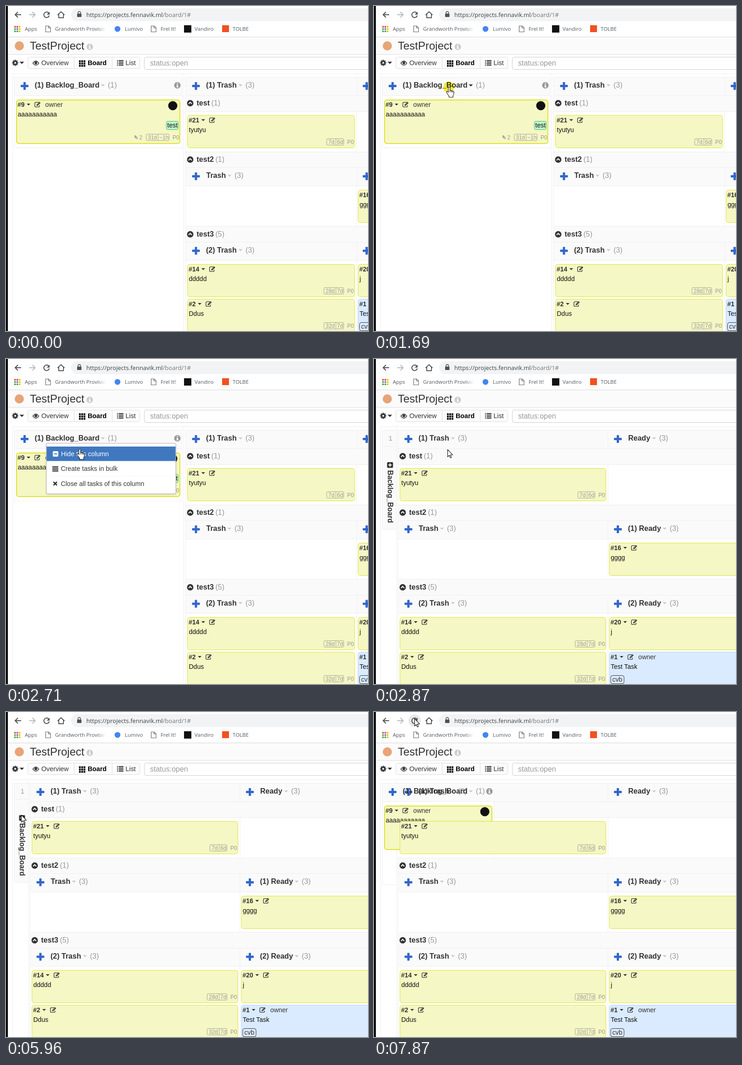
These frames come from a looping animation (789x709 px, 8000 ms). An HTML page:

```html
<!DOCTYPE html>
<html lang="en">
<head>
<meta charset="utf-8">
<title>Board column toggle</title>
<style>
html, body { margin: 0; width: 100%; height: 100%; overflow: hidden; background: #fff; }
svg { display: block; width: 789px; height: 709px; font-family: "Liberation Sans", Arial, sans-serif; }
text { white-space: pre; }
.ui { font-family: "Open Sans", "Noto Sans", sans-serif; }
.b { font-weight: 700; }
.anim { animation: 8s step-end infinite; }
#wide { animation-name: wide; }
#narrow { animation-name: narrow; }
#strip { animation-name: strip; }
#overlap { animation-name: overlap; }
#menu { animation-name: menu; }
#lit { animation-name: lit; }
#plain { animation-name: plain; }
#caret { animation-name: caret; }
#under { animation-name: under; }
#reload { animation-name: reload; }
#cursor { animation-name: move; }
#hand { animation-name: hand; }
#arrow { animation-name: arrow; }
#spot { animation-name: spot; mix-blend-mode: multiply; }
@keyframes wide { 0% { opacity: 1 } 35.875% { opacity: 0 } }
@keyframes narrow { 0% { opacity: 0 } 35.875% { opacity: 1 } }
@keyframes strip { 0% { opacity: 0 } 35.875% { opacity: 1 } 78.875% { opacity: 0 } }
@keyframes overlap { 0% { opacity: 0 } 78.875% { opacity: 1 } }
@keyframes menu { 0% { opacity: 0 } 23.25% { opacity: 1 } 35.875% { opacity: 0 } }
@keyframes lit { 0% { opacity: 0 } 29.375% { opacity: 1 } }
@keyframes plain { 0% { opacity: 1 } 29.375% { opacity: 0 } }
@keyframes caret { 0% { opacity: 0 } 19% { opacity: 1 } 27.375% { opacity: 0 } }
@keyframes under { 0% { opacity: 0 } 12.625% { opacity: 1 } 14.75% { opacity: 0 } }
@keyframes reload { 0% { opacity: 0 } 96.25% { opacity: 1 } }
@keyframes hand { 0% { opacity: 0 } 4% { opacity: 1 } 35.875% { opacity: 0 } 78.875% { opacity: 1 } 89.625% { opacity: 0 } }
@keyframes arrow { 0% { opacity: 1 } 4% { opacity: 0 } 35.875% { opacity: 1 } 78.875% { opacity: 0 } 89.625% { opacity: 1 } }
@keyframes spot {
  0% { opacity: 0; transform: translate(163px, 177px) }
  21.125% { opacity: 1 }
  23.25% { opacity: 0; transform: translate(161px, 198px) }
  31.5% { opacity: 1; transform: translate(161px, 198px) }
  33.875% { opacity: 0; transform: translate(34px, 225px) }
  76.625% { opacity: 1; transform: translate(34px, 225px) }
  78.875% { opacity: 0 }
}
@keyframes move {
  0% { transform: translate(-60px, -60px) }
  2.125% { transform: translate(233px, 352px) }
  4% { transform: translate(115px, 271px) }
  10.5% { transform: translate(113px, 261px) }
  12.625% { transform: translate(111px, 238px) }
  14.75% { transform: translate(128px, 214px) }
  16.875% { transform: translate(152px, 189px) }
  19% { transform: translate(164px, 177px) }
  27.375% { transform: translate(163px, 186px) }
  29.375% { transform: translate(161px, 195px) }
  31.5% { transform: translate(161px, 197px) }
  35.875% { transform: translate(160px, 197px) }
  42.5% { transform: translate(147px, 200px) }
  44.5% { transform: translate(108px, 210px) }
  46.625% { transform: translate(66px, 219px) }
  48.75% { transform: translate(40px, 223px) }
  50.875% { transform: translate(32px, 223px) }
  74.5% { transform: translate(33px, 224px) }
  78.875% { transform: translate(33px, 229px) }
  87.5% { transform: translate(37px, 218px) }
  89.625% { transform: translate(50px, 172px) }
  91.875% { transform: translate(66px, 112px) }
  94% { transform: translate(78px, 56px) }
  96.25% { transform: translate(86px, 22px) }
  98.375% { transform: translate(88px, 14px) }
}
</style>
</head>
<body>
<script>
const INK = '#333', GREY = '#999', RULE = '#eee', PALE = '#fafafa', BLUE = '#36c';
const YELLOW = ['#f5f7c4', '#dfe32d'], SKY = ['#dbebff', '#a8cfff'];

const text = (x, y, s, size = 14, fill = INK, cls = '') =>
  `<text x="${x}" y="${y}" font-size="${size}" fill="${fill}" class="${cls}">${s}</text>`;
const rect = (x, y, w, h, fill, extra = '') =>
  `<rect x="${x}" y="${y}" width="${w}" height="${h}" fill="${fill}" ${extra}/>`;
const frame = (x, y, w, h, r, stroke, fill = 'none', sw = 1) =>
  rect(x + sw / 2, y + sw / 2, w - sw, h - sw, fill, `rx="${r}" stroke="${stroke}" stroke-width="${sw}"`);
const path = (d, fill = INK, extra = '') => `<path d="${d}" fill="${fill}" ${extra}/>`;
const line = (d, color = INK, w = 1.5, extra = '') =>
  path(d, 'none', `stroke="${color}" stroke-width="${w}" ${extra}`);
const disc = (x, y, r, fill) => `<circle cx="${x}" cy="${y}" r="${r}" fill="${fill}"/>`;
const at = (x, y, s) => `<g transform="translate(${x} ${y})">${s}</g>`;
const layer = (id, s) => `<g id="${id}" class="anim">${s}</g>`;
const h = (x, y, w) => rect(x, y, w, 1, RULE);
const v = (x, y, len) => rect(x, y, 1, len, RULE);

const plus = (x, y) => rect(x - 8.5, y - 2.5, 17, 5, BLUE, 'rx="1"') + rect(x - 2.5, y - 8.5, 5, 17, BLUE, 'rx="1"');
const caret = (x, y, fill = INK, r = 4.5) => path(`M${x - r} ${y - 2}h${2 * r}l${-r} ${r}z`, fill);
const info = (x, y, fill = GREY) => disc(x, y, 7, fill) +
  path(`M${x - 1} ${y - 5}h2.4v2h-2.4zM${x - 2} ${y - 1.6}h3.4v4.4h1v1.6h-4.6v-1.6h1.2v-2.8h-1z`, '#fff');
const edit = (x, y) => at(x, y,
  line('M10 1.2H2.6Q.7 1.2.7 3v6.2q0 1.9 1.9 1.9h6.3q1.9 0 1.9-1.9V7.5', INK, 1.3) +
  path('M4.6 8.6V6.2L10.8 0l2.4 2.4L7 8.6z') + line('M6 6.6 10.8 1.8', '#f5f7c4', .7));
const bars = (x, y, w, n, gap, fill) =>
  Array.from({ length: n }, (_, i) => rect(x, y + i * gap, w, 2, fill)).join('');
const grid3 = (x, y, size, step, fill) => Array.from({ length: 9 }, (_, i) =>
  rect(x + i % 3 * step, y + (i / 3 | 0) * step, size, size, fill(i))).join('');

// Header of a column: add button, name, menu caret and counter
const head = (x, y, label, count, gap) => plus(x, y - 3.5) +
  text(label[0] === '(' ? x + 22 : x + 22.5, y, label, 16, INK, 'b') +
  caret(x + gap, y - 5, '#ccc') + text(x + gap + 11, y, `(${count})`, 16, GREY);

const lane = (x, y, name, count) => disc(x + 10.5, y - 5, 7, INK) +
  line(`M${x + 7} ${y - 3.4}l3.5-3.6 3.5 3.6`, '#fff', 2) + text(x + 24.5, y, name, 16, INK, 'b') +
  text(x + 24.5 + (name.length > 4 ? 41 : 32), y, `(${count})`, 16, GREY);

function times(r, y, a, b) {
  const wa = a.length > 2 ? 26 : 20, wb = b.length > 2 ? 25 : 18, mid = r - 24 - wb;
  return frame(mid - wa, y, wa + wb, 15, 2, '#a5a694') + rect(mid, y, 1, 15, '#a5a694') +
    text(mid - wa + 4, y + 11.5, a, 12, GREY) + text(mid + 3, y + 11.5, b, 12, GREY) +
    text(r - 17, y + 11.5, 'P0', 12, GREY);
}

function card(x, y, r, c) {
  const [fill, edge] = c.tone || YELLOW, cx = x + 11.5 + c.id.length * 7.8;
  return frame(x, y, r - x, c.tall || 72, 5, edge, fill, c.tall ? 2 : 1) +
    text(x + 3, y + 16, c.id, 14, INK, 'b') + caret(cx, y + 11, INK, 4) + edit(cx + 13, y + 5) +
    (c.who ? text(cx + 36.5, y + 16, c.who) : '') + text(x + 3.5, y + 37, c.name, 14, '#111') +
    (c.a ? times(r, y + (c.tall ? 75 : 51), c.a, c.b) : '');
}

function backlog(r) {
  return head(40.5, 178, '(1) Backlog_Board', 1, 170.5) + info(r - 6.5, 173) +
    card(22, 204, r, { id: '#9', who: 'owner', name: 'aaaaaaaaaaa', a: '31d', b: '~1h', tall: 97 }) +
    disc(r - 16.5, 217.5, 10, '#111') +
    frame(r - 31, 251, 27, 19, 3, '#4ab56c', '#bdf4cb') + text(r - 28.5, 265, 'test', 14, '#111') +
    line(`M${r - 100} 285l4 4q2 1.500 2.600 0t-1-2.500l-3.500-3.500q-2-1-1.500 1l3.500 3.500`, GREY, 1.1) +
    text(r - 89.5, 290.5, '2', 12, GREY);
}

function lanes(x, x2) {
  const w = 789 - x;
  return [[155, 75], [318, 74], [481, 73]].map(([y, t]) => rect(x, y, w, t, PALE)).join('') +
    [155, 195, 230, 318, 352, 392, 480, 515, 554].map(y => h(x, y, w)).join('') +
    v(x, 155, 554) + [[155, 40], [230, 88], [352, 128], [515, 194]].map(([y, n]) => v(x2, y, n)).join('') +
    head(x + 23, 178, '(1) Trash', 3, 97) + head(x2 + 22, 178, 'Ready', 3, 79) +
    lane(x, 217, 'test', 1) + lane(x, 340, 'test2', 1) +
    head(x + 23, 375, 'Trash', 3, 73) + head(x2 + 22, 375, '(1) Ready', 3, 102) +
    lane(x, 503, 'test3', 5) +
    head(x + 23, 537.5, '(2) Trash', 3, 97) + head(x2 + 22, 537.5, '(2) Ready', 3, 102);
}

function cards(x, x2) {
  const l = x + 4, r = x2 - 3.5, m = x2 + 3;
  return card(l, 238, r, { id: '#21', name: 'tyutyu', a: '7d', b: '6d' }) +
    card(l, 563, r, { id: '#14', name: 'ddddd', a: '28d', b: '7d' }) +
    card(l, 639, r, { id: '#2', name: 'Ddus', a: '32d', b: '7d' }) +
    card(m, 401, 960, { id: '#16', name: 'gggg' }) +
    card(m, 563, 960, { id: '#20', name: 'j' }) +
    card(m, 639, 960, { id: '#1', who: 'owner', name: 'Test Task', tone: SKY }) +
    frame(m + 3, 690, 30, 19, 4, INK) + text(m + 7, 704, 'cvb');
}

function browser() {
  const g = '#4d5156', doc = x => line(`M${x} 43.500h6.500l4 4v9h-10.500zM${x + 6} 43.500v4.500h4.500`, '#666', 1.2);
  const tone = ['#ea4335', '#ea4335', '#fbbc05', '#34a853', '#4285f4', '#fbbc05', '#34a853', '#34a853', '#fbbc05'];
  const back = 'M33 19H20.500M26 13l-6 6 6 6';
  return rect(142, 5, 700, 28, '#f1f3f4', 'rx="14"') + layer('reload', disc(88.5, 19, 13.5, '#e6e7e9')) +
    line(back, g, 2) + at(83.5, 0, line(back, '#b9bbbe', 2, 'transform="scale(-1 1)"')) +
    line('M93 15.200a6 6 0 1 0 1.300 5.300', g, 2) + path('M95 12.500v6.200h-6.200z', g) +
    line('M112.500 19.500 120 12.500l7.500 7M115 18v7.500h10.200V18', g, 1.8) +
    rect(155, 16.5, 9.5, 7.5, g, 'rx="1"') + line('M157 17v-2.200a2.750 2.750 0 0 1 5.500 0V17', g, 1.4) +
    text(175, 24, 'https://projects.fennavik.ml<tspan fill="#74777b">/board/1#</tspan>', 13, '#3c4043', 'ui') +
    grid3(18, 43.5, 3.5, 5, i => tone[i]) + doc(86.5) + doc(316.5) +
    disc(243, 50, 6.3, '#4285f4') + rect(388, 42, 16, 16, '#111') + rect(471, 42, 15, 15, '#f25022') +
    [[41, 'Apps'], [107, 'Grandworth Provisioni'], [259, 'Lumivo'], [337, 'Frel It!'], [411, 'Vandiro'], [494, 'TOLBE']]
      .map(([x, s]) => text(x, 54, s, 11.5, '#55585c', 'ui')).join('') +
    rect(199, 40, 19, 20, 'url(#fade)') + rect(218, 40, 18, 20, '#fff') + rect(4, 67, 785, 1, '#d5d6d8');
}

function toolbar() {
  const cog = Array.from({ length: 8 }, (_, i) =>
    rect(-1.4, -6.7, 2.8, 4, INK, `transform="rotate(${i * 45})"`)).join('');
  return rect(4, 68, 785, 37, '#fbfbfb') + rect(4, 105, 785, 1, '#ddd') +
    disc(29, 87, 10, '#e8a577') + text(52, 95, 'TestProject', 24) + info(182.5, 89, '#ccc') +
    at(20, 124, cog + disc(0, 0, 4.8, INK) + disc(0, 0, 2, '#fff')) + caret(34.5, 123.5, INK, 5) +
    frame(47, 111, 245, 26, 4, '#ddd', '#fcfcfc') + rect(148, 112, 1, 24, '#ddd') + rect(231, 112, 1, 24, '#ddd') +
    line('M58.500 124.500q6.500-9 13 0q-6.500 9-13 0z', INK, 1.3) + disc(65, 124, 3, INK) +
    text(77, 129, 'Overview', 14.3) +
    grid3(159, 118.5, 4, 5, () => '#111') + text(178, 129, 'Board', 14.3, '#000', 'b') +
    bars(242, 118, 2, 4, 3.4, INK) + bars(245.5, 118, 10.5, 4, 3.4, INK) + text(260.5, 129, 'List', 14.3) +
    frame(301, 111, 520, 28, 4, '#ccc', '#fff') + text(314, 130, 'status:open', 16, GREY);
}

function menu() {
  const hide = (ink, bg) => rect(102, 201, 12, 12, ink, 'rx="2"') + rect(104.5, 206, 7, 2, bg) + text(120, 212, 'Hide this column', 14.1, ink);
  return rect(88, 184, 282, 110, '#fff', 'rx="2" stroke="#b2b2b2" filter="url(#shade)"') +
    layer('plain', hide(INK, '#fff')) + layer('lit', rect(88.5, 191, 281, 31.5, '#4078c0') + hide('#fff', '#4078c0')) +
    rect(89, 255, 280, 1, '#f5f5f5') +
    bars(101, 234, 13, 4, 3.2, INK) + text(119.5, 244, 'Create tasks in bulk', 14.1) +
    line('M103.500 268l7.500 7.500m0-7.500-7.500 7.500', INK, 2.8) + text(119.5, 277, 'Close all tasks of this column', 14.1);
}

const wide = v(387, 148, 561) + rect(18, 155, 366, 40, PALE) + h(18, 155, 366) + h(18, 195, 366) +
  h(18, 309, 366) + v(18, 155, 155) + v(383, 155, 155) + backlog(380) +
  layer('caret', caret(211, 173)) + layer('under', rect(26, 243, 86, 1, '#111')) +
  lanes(391, 764) + cards(391, 764) + layer('menu', menu());

const strip = rect(18, 155, 31, 216, PALE) + h(18, 155, 31) + h(18, 190, 31) + h(18, 371, 31) + v(18, 155, 216) +
  text(32, 178, '1', 14, GREY) + rect(28.5, 225, 13, 12.5, INK, 'rx="2"') +
  path('M34 227.500h2v2.800h2.800v2H36v2.800h-2v-2.800h-2.800v-2H34z', '#fff') +
  `<g transform="translate(30 242.500) rotate(90)">${text(0, 0, 'Backlog_Board', 15.7, INK, 'b')}</g>`;

const overlap = rect(18, 155, 39, 40, PALE) + rect(18, 196, 243, 121, '#fff') + h(18, 155, 39) + h(18, 195, 243) +
  v(18, 155, 221) + v(261, 195, 123) + v(49, 301, 75) + h(18, 376, 31) + backlog(258);

const narrow = v(49, 148, 561) + lanes(52, 509.5) + layer('strip', strip) + layer('overlap', overlap) + cards(52, 509.5);

const ink = 'stroke="#111" stroke-width="1.1" stroke-linejoin="round"';
const cursor = layer('hand',
  path('M-2 1.500Q-2-.5-.2-.5T1.600 1.500V7q2.600-.6 3.100 1 2.400-.6 2.900 1.100 2.700-.4 2.700 2.200 0 4-2 7V22H-.5v-2.500L-5.200 13q-1.500-2.700-.3-3.500 1.400-.9 3.500 2z', '#fff', ink) +
  line('M1.600 7v4M4.700 8v3.500M7.600 9.100v3', '#111', 1)) +
  layer('arrow', path('M.5.7V16.400L4 13.100l2.500 5.600 2.300-1-2.400-5.500h4.900z', '#fff', ink));

document.body.innerHTML = `<svg viewBox="0 0 789 709"><defs>
  <linearGradient id="fade"><stop stop-color="#fff" stop-opacity="0"/><stop offset="1" stop-color="#fff"/></linearGradient>
  <filter id="shade"><feDropShadow dx="0" dy="1" stdDeviation="1.5" flood-opacity=".2"/></filter></defs>` +
  rect(0, 0, 789, 709, '#fff') + browser() + toolbar() + h(14, 147, 775) + v(14, 147, 562) +
  layer('wide', wide) + layer('narrow', narrow) + rect(0, 0, 4, 709, '#000') +
  layer('spot', disc(0, 0, 12, '#f6ee3c')) + layer('cursor', cursor) + '</svg>';
</script>
</body>
</html>
```
